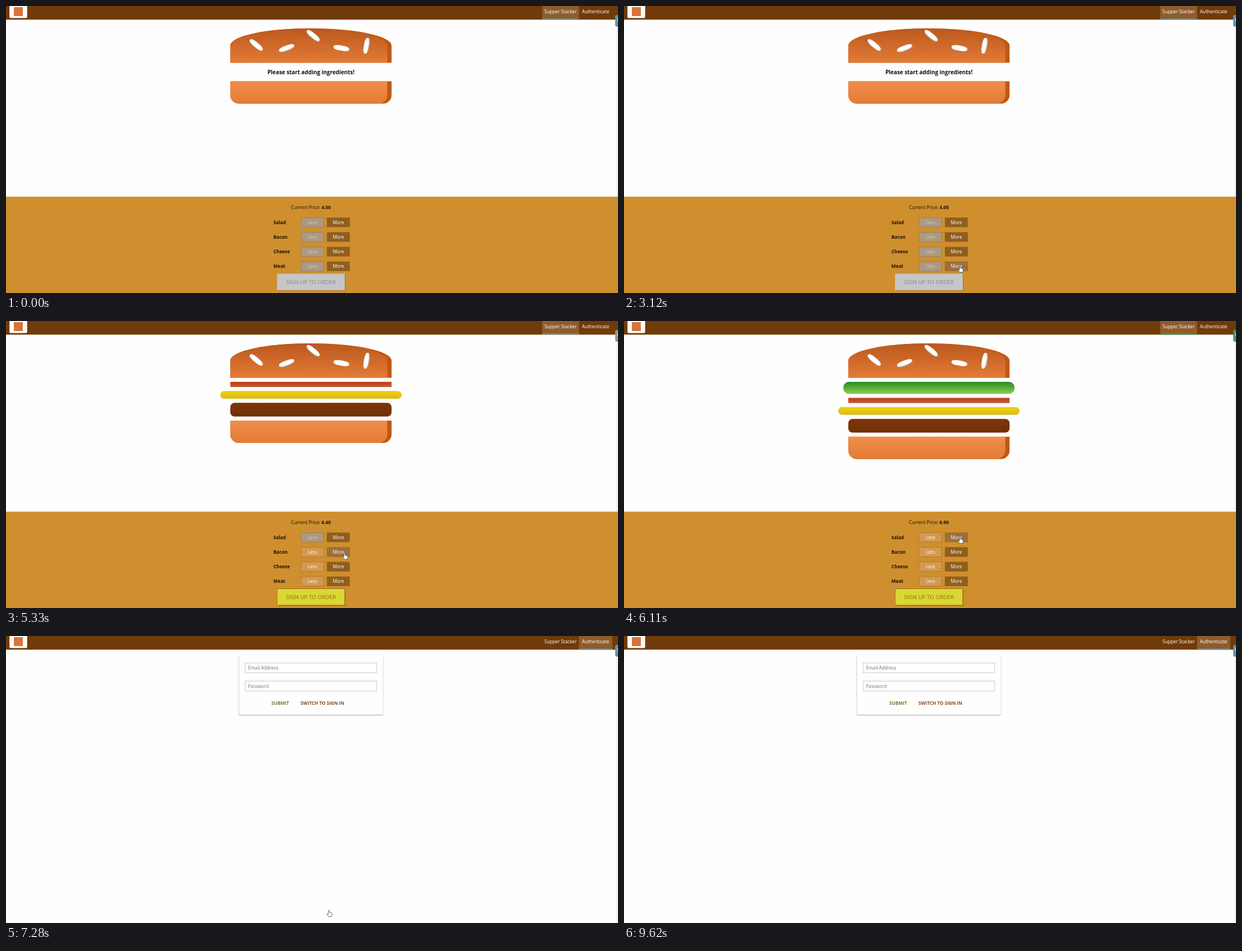
Recreate the animation shown at these times as an HTML page with a canvas. Size 1091 px wide and 513 px high, loop 9750 ms.

```html
<!DOCTYPE html>
<html lang="en">
<head>
<meta charset="utf-8">
<title>Sandwich ordering</title>
<style>
  html, body { margin: 0; width: 100%; height: 100%; overflow: hidden; background: #fefefe; }
  canvas { display: block; width: 100vw; height: 100vh; }
</style>
</head>
<body>
<canvas id="stage" width="1091" height="513"></canvas>
<script>
const ctx = document.getElementById('stage').getContext('2d');
const LOOP = 9750, STEP = 130, AUTH_AT = 7280;
const W = 1091, H = 513, CX = 543.6, ZOOM = 0.5134;
const FONT = 8.21, BIG = 9.86;

// Stacking order from the top bun down; rows list the controls.
const LAYERS = {
  Salad:  { w: 595, h: 42, r: 20, colors: ['#228c1d', '#91ce50'], price: 0.5 },
  Bacon:  { w: 560, h: 18, r: 0,  colors: ['#bf3813', '#c45e38'], price: 0.7 },
  Cheese: { w: 630, h: 27, r: 13.5, colors: ['#f4d004', '#d6bb22'], price: 0.4 },
  Meat:   { w: 560, h: 48, r: 15, colors: ['#7f3608', '#702e05'], price: 1.3 }
};
const NAMES = Object.keys(LAYERS);
const ADDED = { Meat: 3510, Cheese: 4420, Bacon: 5200, Salad: 6110 };

// Pointer keys: time, x, y
const PATH = [
  [130, 690, 508], [650, 660, 440], [910, 660, 440], [1690, 625, 405],
  [1950, 625, 405], [2080, 622, 420], [2470, 622, 420], [3120, 599, 464.5],
  [3770, 599, 464.5], [4160, 599, 437.5], [4680, 599, 437.5],
  [5070, 603.5, 414.5], [5460, 603.5, 414.5], [5850, 599, 386],
  [6240, 599, 386], [7020, 575.5, 490], [7670, 575.5, 490],
  [8710, 640, 240], [8840, 640, 240], [9360, 1091, 200]
];

const MORE = { x: 571.9, w: 41.1 }, LESS = { x: 525.7, w: 41.1 };
const BTN_H = 17.4;
const ORDER = { x: 483.1, y: 478.4, w: 121, h: 29.8 };
const rowY = i => 386.7 + 26.2 * i;

function pointerAt(t) {
  if (t < PATH[0][0] || t >= PATH[PATH.length - 1][0]) return null;
  const i = PATH.findIndex(k => k[0] > t);
  const [t0, x0, y0] = PATH[i - 1], [t1, x1, y1] = PATH[i];
  const u = (t - t0) / (t1 - t0), e = u * u * (3 - 2 * u);
  return { x: x0 + (x1 - x0) * e, y: y0 + (y1 - y0) * e };
}

const inside = (p, x, y, w, h) => p && p.x >= x && p.x <= x + w && p.y >= y && p.y <= y + h;

function rect(x, y, w, h, color) {
  ctx.fillStyle = color;
  ctx.fillRect(x, y, w, h);
}

function framed(x, y, w, h, fill, edge, line = 0.6) {
  rect(x, y, w, h, edge);
  rect(x + line, y + line, w - 2 * line, h - 2 * line, fill);
}

function text(str, x, mid, color, { size = FONT, bold = false, align = 'left' } = {}) {
  ctx.font = `${bold ? 700 : 400} ${size}px "Open Sans", sans-serif`;
  ctx.textAlign = align;
  ctx.fillStyle = color;
  ctx.fillText(str, x, mid + size * 0.388);
  return ctx.measureText(str).width;
}

function round(x, y, w, h, radii) {
  ctx.beginPath();
  ctx.roundRect(x, y, w, h, radii);
}

function shade(y, h, [a, b]) {
  const g = ctx.createLinearGradient(0, y, 0, y + h);
  g.addColorStop(0, a);
  g.addColorStop(1, b);
  return g;
}

// Rounded box with a hard inner shadow at the given offset.
function insetBox(x, y, w, h, radii, fill, edge, dx, dy) {
  ctx.save();
  round(x, y, w, h, radii);
  ctx.fillStyle = edge;
  ctx.fill();
  ctx.clip();
  round(x + dx, y + dy, w, h, radii);
  ctx.fillStyle = fill;
  ctx.fill();
  ctx.restore();
}

// Seed at an offset from the current centre; children share its rotated frame.
function seed(x, y, deg, dx, dy, children) {
  ctx.save();
  ctx.translate(x, y);
  ctx.rotate(deg * Math.PI / 180);
  insetBox(-28, -9, 56, 18, { x: 22.4, y: 7.2 }, '#fff', '#c9c9c9', dx, dy);
  if (children) children();
  ctx.restore();
}

function burger(t) {
  ctx.save();
  ctx.translate(CX - 350 * ZOOM, 32.7);
  ctx.scale(ZOOM, ZOOM);

  const dome = { x: 280, y: 60 };
  insetBox(70, 14, 560, 120, [dome, dome, 0, 0], shade(14, 120, ['#bc581e', '#e27b36']), '#c15711', -15, 0);
  seed(266, 83, -20, -2, -3, () => {
    seed(-95.2, -46.8, 60, -1, 2);
    seed(100.8, -9, 60, -1, -3);
  });
  seed(456.4, 83, 10, -3, 0, () => seed(84, -23.4, 90, 1, 3));

  let y = 148;
  const stack = NAMES.filter(n => t >= ADDED[n]);
  for (const name of stack) {
    const { w, h, r, colors } = LAYERS[name];
    round(350 - w / 2, y, w, h, r);
    ctx.fillStyle = shade(y, h, colors);
    ctx.fill();
    y += h + 14;
  }
  if (!stack.length) {
    text('Please start adding ingredients!', 350, 166.5, '#111', { size: 19.2, bold: true, align: 'center' });
    y = 198.4;
  }
  insetBox(70, y, 560, 78, [0, 0, 30, 30], shade(y, 78, ['#f08e4a', '#e27b36']), '#c15711', -15, 0);
  ctx.restore();
}

function orderButton(t, p) {
  const on = t >= ADDED.Meat;
  const hot = on && inside(p, ORDER.x, ORDER.y, ORDER.w, ORDER.h);
  const u = (t - ADDED.Meat) / 300;
  const pulse = u > 0 && u < 1 ? 1 + 0.1 * (u < 0.6 ? u / 0.6 : (1 - u) / 0.4) : 1;
  const mid = ORDER.y + ORDER.h / 2;
  ctx.save();
  ctx.translate(CX, mid);
  ctx.scale(pulse, pulse);
  ctx.translate(-CX, -mid);
  ctx.save();
  ctx.shadowColor = '#966909';
  ctx.shadowBlur = 1;
  ctx.shadowOffsetX = ctx.shadowOffsetY = 1;
  rect(ORDER.x, ORDER.y, ORDER.w, ORDER.h, '#966909');
  ctx.restore();
  framed(ORDER.x, ORDER.y, ORDER.w, ORDER.h, !on ? '#c7c6c6' : hot ? '#a0db41' : '#dad735', on ? '#966909' : '#ccc');
  text('SIGN UP TO ORDER', CX, mid, on ? '#966909' : '#888', { size: BIG, align: 'center' });
  ctx.restore();
  return hot;
}

function controls(t, p) {
  rect(0, 340.8, W, H, '#cf8f2e');
  const price = NAMES.reduce((sum, n) => sum + (t >= ADDED[n] ? LAYERS[n].price : 0), 4);
  const w = text('Current Price: ', 508, 359.7, '#1c1408');
  text(price.toFixed(2), 508 + w, 359.7, '#1c1408', { bold: true });

  let hand = false;
  NAMES.forEach((name, i) => {
    const mid = rowY(i), top = mid - BTN_H / 2;
    const on = t >= ADDED[name];
    const hot = inside(p, MORE.x, top, MORE.w, BTN_H);
    hand = hand || hot;
    text(name, 476.8, mid, '#1c1408', { bold: true });
    framed(LESS.x, top, LESS.w, BTN_H, on ? '#d39952' : '#ac9980', on ? '#aa6817' : '#7e7365');
    text('Less', LESS.x + LESS.w / 2, mid, on ? '#fff' : '#ccc', { align: 'center' });
    framed(MORE.x, top, MORE.w, BTN_H, hot ? '#99703f' : '#8f5e1e', '#aa6817', 0.5);
    text('More', MORE.x + MORE.w / 2, mid, '#fff', { align: 'center' });
  });
  return orderButton(t, p) || hand;
}

function authForm() {
  ctx.save();
  ctx.shadowColor = '#bbb';
  ctx.shadowBlur = 2;
  ctx.shadowOffsetY = 1;
  rect(415.4, 33.6, 256.6, 107, '#eee');
  ctx.restore();
  rect(415.9, 34.1, 255.6, 106, '#fefefe');
  ['Email Address', 'Password'].forEach((label, i) => {
    const y = 47.8 + 32.5 * i;
    framed(425.9, y, 235.3, 18.3, '#fff', '#bbb', 0.8);
    text(label, 431.4, y + 9.2, '#757575');
  });
  text('SUBMIT', 473, 119.5, '#5f8128', { bold: true });
  text('SWITCH TO SIGN IN', 525, 119.5, '#8c4a1b', { bold: true });
}

function toolbar(accent, auth) {
  rect(0, 0, W, 24.4, '#703b09');
  round(6.2, -1.5, 31.5, 23, 2.6);
  ctx.fillStyle = '#fff';
  ctx.fill();
  rect(14, 2, 16, 16, '#d9733a');
  const [x, w] = auth ? [1021.5, 59.3] : [955.8, 65.7];
  rect(x, 0, w, 24.4, '#8f5c2c');
  rect(x, 22.6, w, 1.8, accent);
  text('Supper Stacker', 988.5, 9.4, '#fff', { align: 'center' });
  text('Authenticate', 1026.7, 9.4, '#fff');
}

function sideTab(accent) {
  round(1086, 16, 8, 21, 3);
  ctx.fillStyle = accent;
  ctx.fill();
  rect(1090, 22, 1, 5, '#e4eef0');
}

function drawPointer({ x, y }, hand) {
  ctx.save();
  ctx.translate(x, y);
  ctx.beginPath();
  if (hand) {
    ctx.moveTo(-1, 0.8);
    ctx.quadraticCurveTo(0, -0.8, 1, 0.8);
    ctx.lineTo(1, 4);
    ctx.lineTo(5, 5);
    ctx.quadraticCurveTo(6, 5.3, 5.8, 7);
    ctx.lineTo(4.8, 11.5);
    ctx.lineTo(-0.5, 11.5);
    ctx.lineTo(-3.3, 7.4);
    ctx.quadraticCurveTo(-3.2, 5.8, -1, 7.2);
  } else {
    for (const [px, py] of [[0, 0], [0, 9.5], [2.2, 7.5], [3.7, 11], [5.1, 10.4], [3.7, 7], [6.6, 6.8]]) ctx.lineTo(px, py);
  }
  ctx.closePath();
  ctx.fillStyle = '#fff';
  ctx.fill();
  ctx.strokeStyle = '#333';
  ctx.lineWidth = 0.7;
  ctx.lineJoin = 'round';
  ctx.stroke();
  ctx.restore();
}

function accentAt(t) {
  if (t >= AUTH_AT || t < ADDED.Cheese) return '#559bb2';
  return t < ADDED.Salad ? '#8a9a90' : '#3fa056';
}

function draw(t) {
  const auth = t >= AUTH_AT, p = pointerAt(t), accent = accentAt(t);
  rect(0, 0, W, H, '#fefefe');
  rect(1088, 24, 3, H, '#f0f0f0');
  let hand = auth && t < 7800;
  if (auth) {
    authForm();
  } else {
    burger(t);
    hand = controls(t, p);
  }
  toolbar(accent, auth);
  sideTab(accent);
  if (p) drawPointer(p, hand);
}

const start = performance.now();
function tick() {
  const t = (performance.now() - start) % LOOP;
  draw(Math.floor(t / STEP) * STEP);
  requestAnimationFrame(tick);
}
tick();
</script>
</body>
</html>
```
